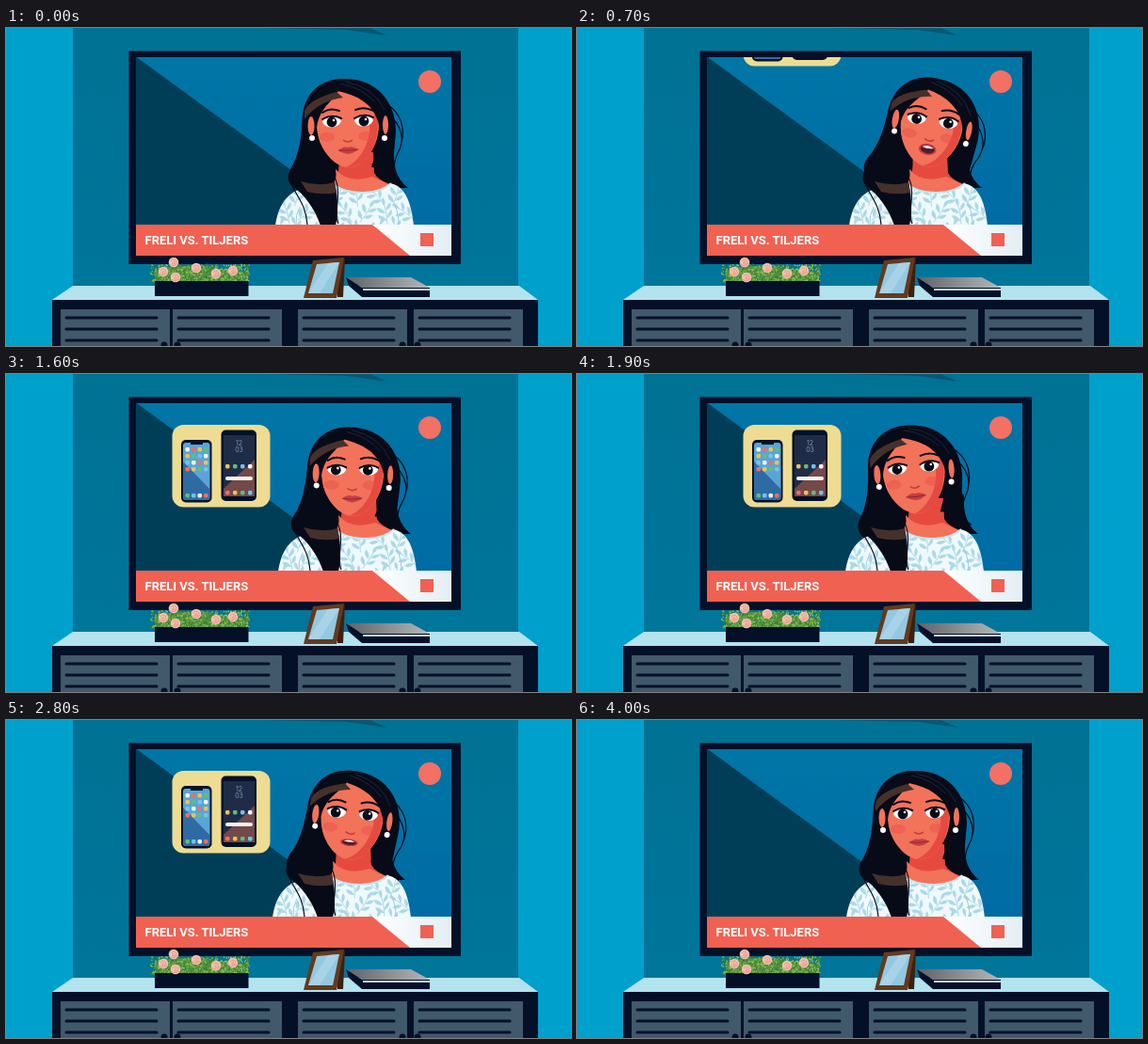
Animation of 600 by 338 pixels, one loop 4200 ms. Source, as an HTML page:

```html
<!DOCTYPE html>
<html lang="en">
<head>
<meta charset="utf-8">
<title>Phone news on TV</title>
<style>
html, body { margin: 0; width: 100%; height: 100%; overflow: hidden; background: #00a0cc }
svg { display: block; width: 600px; height: 338px }
.hair { fill: #070b18 }
.strand { fill: none; stroke: #070b18; stroke-width: 1.2 }
.brown { fill: #45302c }
.skin { fill: #f3725a }
.shade { fill: #e64a3f }
.ink { fill: #041028 }
.line { fill: none; stroke: #070b18; stroke-width: 2; stroke-linecap: round }
</style>
</head>
<body>
<svg viewBox="0 0 600 338">
<defs>
  <linearGradient id="wall" x2="0" y2="1"><stop stop-color="#007294"/><stop offset="1" stop-color="#00769b"/></linearGradient>
  <linearGradient id="studio" x2="0" y2="1"><stop stop-color="#0076a6"/><stop offset="1" stop-color="#0069a4"/></linearGradient>
  <linearGradient id="wedge"><stop stop-color="#fff"/><stop offset="1" stop-color="#e3eef5"/></linearGradient>
  <linearGradient id="cover"><stop stop-color="#5f6266"/><stop offset="1" stop-color="#b4b8bb"/></linearGradient>
  <clipPath id="screen"><path d="M138 31H473V242H138Z"/></clipPath>
  <clipPath id="shirtClip"><use href="#shirt"/></clipPath>
  <clipPath id="eyeClip"><path d="M-11-9H11V2Q6 7 0 7Q-7 7-11 1Z"/></clipPath>
  <path id="shirt" d="M286 210C289 191 296 176 316 170Q336 165 350 167C364 177 396 177 408 165C422 168 430 181 433 210Z"/>
  <g id="eye" clip-path="url(#eyeClip)">
    <path fill="#fff" d="M-10 0C-6-9 6-9 10-1C7 7-6 8-10 0Z"/>
    <g id="iris"><circle class="hair" r="5.4"/><circle fill="#fff" cx="2" cy="-2" r="1.3"/></g>
    <g id="lid"><path class="skin" d="M-11-14H11V0Q0-6-11 0Z"/><path class="line" d="M-10 0Q0-6 10-1"/></g>
  </g>
  <g id="sprig" fill="#acd9e7">
    <path d="M0 13Q2 0 0-13" fill="none" stroke="#acd9e7"/>
    <path d="M0-9Q-4-14 0-19Q4-14 0-9M0 0Q-9-1-9-8Q-2-7 0 0M1-3Q9-5 8-12Q2-9 1-3M0 9Q-9 8-9 1Q-2 2 0 9M1 6Q9 4 8-3Q2 0 1 6"/>
  </g>
  <g id="rose"><circle r="5.3" fill="#f7bfae"/><path d="M-3-1Q0-5 3-1Q2 3-1 2Q-2 0 1-1M-4 2Q0 6 4 1" fill="none" stroke="#e08f83" stroke-width=".8"/></g>
  <g id="door">
    <path fill="#40596b" d="M0 299H116V338H0Z"/>
    <path d="M6 308H102M6 320H102M6 332H102" stroke="#041028" stroke-width="3" stroke-linecap="round"/>
  </g>
</defs>

<path fill="#00a0cc" d="M0 0H600V338H0Z"/>
<path fill="url(#wall)" d="M71 0H544V289H71Z"/>
<path fill="#075875" d="M273 0H387L404 8L362 2Z"/>
<path class="ink" d="M130.500 24.500H483V251H130.500Z"/>

<g clip-path="url(#screen)">
  <path fill="url(#studio)" d="M138 31H473V242H138Z"/>
  <path fill="#003e58" d="M138 30.500L382 209H138Z"/>
  <circle cx="450" cy="57" r="12" fill="#f27064"/>

  <g id="card">
    <rect x="176.500" y="54" width="104" height="87.500" rx="12" fill="#eddc92"/>
    <rect x="186" y="70" width="32.500" height="66.500" rx="5" class="ink"/>
    <rect x="188" y="73" width="28.500" height="61" rx="3" fill="#5aa4d6"/>
    <path fill="#2f6ba3" d="M188 93L216 122V131Q216 134 213 134H191Q188 134 188 131Z"/>
    <path class="ink" d="M196 72H209V75H196Z"/>
    <rect x="228.500" y="59.500" width="37.500" height="75.500" rx="5" class="ink"/>
    <path fill="#1f2c47" d="M231 65H264V130H231Z"/>
    <path fill="#74494a" d="M264 91V130H231V122Z"/>
    <rect x="233" y="109" width="29" height="4" rx="2" fill="#f4f4f0"/>
    <g font-family="Inter, sans-serif" font-size="7" fill="#8796a8" text-anchor="middle"><text x="247.500" y="76">12</text><text x="247.500" y="83">03</text></g>
    <g id="icons"></g>
  </g>

  <g class="head">
    <path class="hair" d="M358 54C334 54 318 69 315 92C314 117 311 136 302 150C297 160 300 168 310 172L350 170L406 162C411 150 412 134 414 110C414 76 391 53 358 54Z"/>
    <path class="strand" d="M404 90C421 103 424 119 416 133C409 147 413 160 420 164M406 82C419 91 424 106 420 122"/>
  </g>
  <g class="body">
    <path class="hair" d="M386 120C392 140 385 155 378 170L427 170C414 160 411 146 412 128Z"/>
    <path class="shade" d="M353 132H390L391 154Q395 162 410 167Q383 188 344 167Q356 161 353 132Z"/>
    <path class="skin" d="M350 150Q363 166 389 158L408 167Q383 184 346 168Q352 162 350 150Z"/>
    <use href="#shirt" fill="#eff9fc"/>
    <g id="leaves" clip-path="url(#shirtClip)"></g>
    <path d="M349 167C364 178 396 178 409 165" fill="none" stroke="#c6e5ee" stroke-width="2"/>
    <path d="M312 190Q307 199 308 210M412 186Q417 196 417 210" fill="none" stroke="#9ecbdc"/>
  </g>
  <g class="head">
    <ellipse class="skin" cx="325" cy="103" rx="5.500" ry="11.500"/>
    <path class="skin" d="M328 92C329 72 344 65 360 67C382 66 395 80 396 97C397 117 390 133 378 143Q365 153 351 144C338 135 328 117 328 92Z"/>
    <path class="shade" d="M394 86C398 112 391 133 378 143Q370 149 361 148C379 140 388 117 386 101Z"/>
    <g fill="#e94f48" opacity=".45"><ellipse cx="341" cy="116" rx="8" ry="5"/><ellipse cx="382" cy="115" rx="8" ry="5"/></g>
    <use href="#eye" x="346" y="100"/><use href="#eye" x="380" y="99"/>
    <g id="brows"><path class="line" d="M336 90Q344 84 354 88M371 87Q381 83 390 88"/></g>
    <path d="M358 119Q363 123 368 119" fill="none" stroke="#c23b36" stroke-width="1.500"/>
    <g id="closed"><path fill="#c93d40" d="M353 130Q359 125 363 127Q368 125 374 129Q364 138 353 130Z"/><path d="M353 130Q363 131 374 129" fill="none" stroke="#872d3b"/></g>
    <g id="open"><ellipse rx="9.500" ry="6" fill="#c93d40"/><ellipse rx="7.500" ry="4.300" fill="#551d2c"/><path d="M-6-2Q0-6 6-2Q0 0-6-2Z" fill="#fff"/></g>
    <path class="hair" d="M356 60C351 77 333 82 330 106C332 125 340 139 347 152L303 152C313 136 314 115 315 92Q328 54 358 54Z"/>
    <path class="hair" d="M347 66C370 70 388 78 395 99C400 118 392 135 388 148L411 149C410 138 413 122 413 104Q406 62 365 56Z"/>
    <path class="brown" d="M317 88C322 77 337 72 351 68L358 74C342 76 328 83 317 97Z"/>
    <path d="M355 59Q377 63 391 78M360 57Q390 62 402 87" fill="none" stroke="#273049" stroke-width=".7"/>
    <ellipse class="skin" cx="324" cy="104" rx="3.500" ry="10"/>
    <ellipse class="skin" cx="403" cy="103" rx="3" ry="10"/>
    <g fill="#fff"><circle cx="325" cy="117" r="3"/><circle cx="402" cy="117" r="3"/></g>
  </g>
  <g class="body">
    <path class="hair" d="M308 143C301 152 297 161 304 168C317 177 328 192 334 210H350C355 190 351 164 342 143Z"/>
    <path class="brown" d="M313 163Q332 169 349 164L351 175Q335 178 320 174Z"/>
    <path class="strand" d="M304 155C298 172 318 179 320 209M346 153C360 174 346 194 353 208"/>
  </g>

  <path fill="#f06152" d="M138 209H473V242H138Z"/>
  <path fill="url(#wedge)" d="M389 209H473V242H429Z"/>
  <path fill="#f06152" d="M440 218H454V232H440Z"/>
  <text x="147.500" y="230" font-family="Roboto, sans-serif" font-size="13" font-weight="700" fill="#fff">FRELI VS. TILJERS</text>
</g>

<path fill="#b2e3ef" d="M71 274H545L565 289H49Z"/>
<path class="ink" d="M49 289H565V338H49Z"/>
<use href="#door" x="58"/><use href="#door" x="177"/><use href="#door" x="310"/><use href="#door" x="433"/>
<g class="ink"><circle cx="168" cy="337" r="3.500"/><circle cx="182" cy="337" r="3.500"/><circle cx="421" cy="337" r="3.500"/><circle cx="437" cy="337" r="3.500"/></g>

<path fill="#55923f" d="M158 270V257Q180 251 208 254T257 259V270Z"/>
<g id="grass" fill="none" stroke-width="1.200"></g>
<path class="ink" d="M158 269H257.500V285H158Z"/>
<g id="roses"></g>

<path fill="#3b2012" d="M350 251L360 245L358 286H352L350 270L346 286Z"/>
<path fill="#643a1c" d="M326 247L359 244L351 287H316Z"/>
<path fill="#94c8e1" d="M330 251L354 249L347 282H321Z"/>
<path fill="#a8d3e7" d="M342 250L354 249L333 282H321Z"/>

<path fill="url(#cover)" d="M361 265H430L450 276H378Z"/>
<path class="ink" d="M361 265L378 276H450V286H378L364 274Z"/>
<path fill="#c6d2d9" d="M379 277H450V279H379Z"/>
</svg>
<script>
const $ = id => document.getElementById(id);
const place = (selector, value) =>
  document.querySelectorAll(selector).forEach(el => el.setAttribute('transform', value));

let seed = 7;
const random = () => (seed = seed * 16807 % 2147483647) / 2147483647;

// Grass
for (const color of ['#2f6f35', '#7fb54a', '#3d8239', '#8fc257']) {
  let d = '';
  for (let i = 0; i < 170; i++)
    d += `M${154 + random() * 105} ${252 + random() * 19}l${random() * 2 - 1} -1.500`;
  $('grass').innerHTML += `<path d="${d}" stroke="${color}"/>`;
}
$('roses').innerHTML = [[178, 249], [167, 259], [180, 265], [202, 255], [223, 261], [241, 258]]
  .map(([x, y]) => `<use href="#rose" x="${x}" y="${y}"/>`).join('');

// Blouse pattern
for (let row = 0; row < 3; row++)
  for (let col = 0; col < 8; col++)
    $('leaves').innerHTML += `<use href="#sprig" transform="translate(${288 + col * 21 + row % 2 * 10} ${178 + row * 19}) rotate(${(col * 67 + row * 40) % 110 - 55}) scale(.9)"/>`;

// Phone icons
const palette = ['#f4f4f0', '#f26d62', '#ecc34f', '#60bd7e', '#70c4ec'];
const iconRow = (x, y, gap, shift) => {
  for (let i = 0; i < 4; i++)
    $('icons').innerHTML += `<rect x="${x + i * gap}" y="${y}" width="4.500" height="4.500" rx="1.400" fill="${palette[(i + shift) % 5]}"/>`;
};
[78, 85, 92, 99, 127].forEach((y, i) => iconRow(190.500, y, 6.500, i * 2));
iconRow(233, 96, 8, 2);
iconRow(233, 124, 8, 1);

// time, body x, head y, tilt, eyelid, gaze
const poses = [
  [0, 0, 0, 0, 0, 0],
  [200, 0, 0, 0, 0, 0],
  [700, 3, 0, 10, 0, 0],
  [1100, 3, 0, 9, 0, 0],
  [1600, 3, 3, 2, .12, -1],
  [2200, -5, -4, -10, 0, 0],
  [2400, -5, -4, -10, 0, 0],
  [2800, -3, 1, 7, 0, -1],
  [3100, -2, 1, 6, 0, -1],
  [3500, 1, 4, 1, .5, -1],
  [4000, 0, 0, 0, 0, 0],
  [4200, 0, 0, 0, 0, 0]
];
const clamp = x => Math.min(1, Math.max(0, x));
const smooth = p => p * p * (3 - 2 * p);
const backIn = p => 2.7 * p ** 3 - 1.7 * p * p;

function poseAt(t) {
  const i = poses.findIndex(pose => pose[0] > t);
  const a = poses[i - 1], b = poses[i];
  const p = smooth((t - a[0]) / (b[0] - a[0]));
  return a.map((value, k) => value + (b[k] - value) * p);
}

function draw() {
  const t = Math.min(4000, Math.floor(performance.now() % 4200 / 100) * 100);
  const [, x, y, tilt, lid, gaze] = poseAt(t);
  place('.body', `translate(${x} 0)`);
  place('.head', `translate(${x} ${y}) rotate(${tilt} 372 165)`);
  place('#lid', `translate(0 ${-3 + lid * 8})`);
  place('#iris', `translate(${gaze} 0)`);
  place('#brows', `translate(0 ${lid * 2})`);

  const talking = t >= 300 && t <= 1300 || t >= 2400 && t <= 3200;
  const gape = .3 + .7 * Math.abs(Math.cos((t - 700) / 200));
  $('closed').style.display = talking ? 'none' : '';
  $('open').style.display = talking ? '' : 'none';
  place('#open', `translate(363 130) scale(1 ${gape})`);

  const away = t < 2000 ? clamp((1250 - t) / 600) : clamp((t - 3250) / 600);
  place('#card', `translate(0 ${-155 * backIn(away)})`);
  requestAnimationFrame(draw);
}
draw();
</script>
</body>
</html>
```
